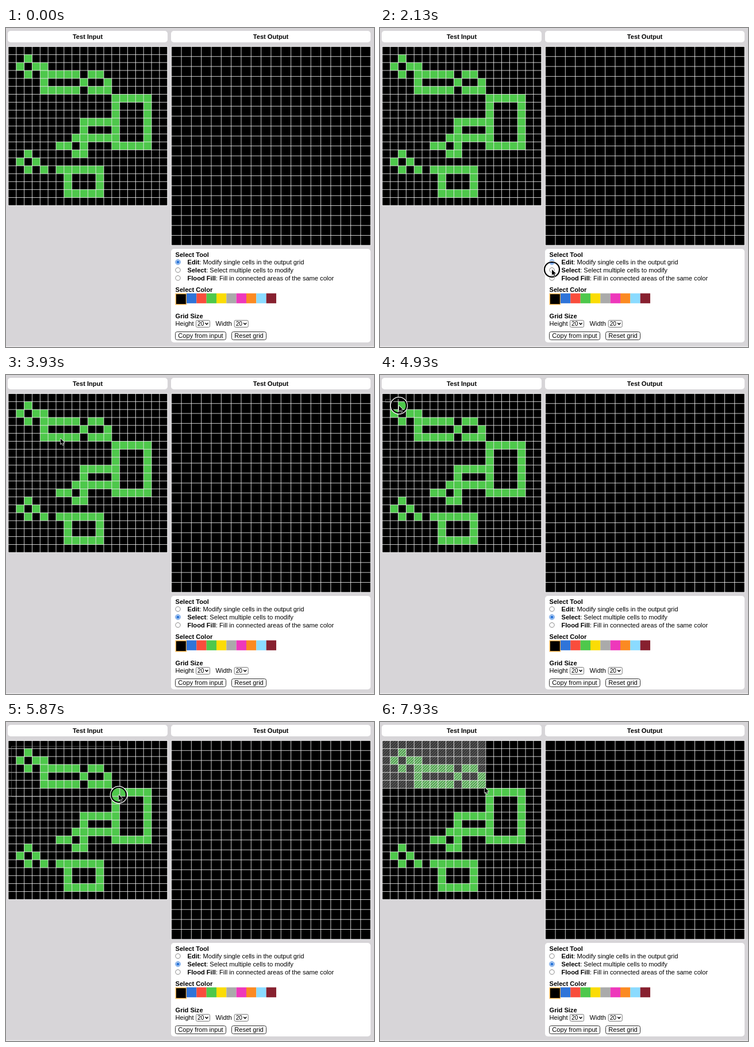
These frames come from a looping animation (640x556 px, 8 s). An HTML page with a canvas:

```html
<!DOCTYPE html>
<html lang="en">
<head>
<meta charset="utf-8">
<title>Grid editor</title>
<style>
  html, body { margin: 0; width: 100%; height: 100%; overflow: hidden; background: #d7d5d8; }
  canvas { display: block; }
</style>
</head>
<body>
<canvas id="stage" width="640" height="556"></canvas>
<script>
const ctx = document.getElementById('stage').getContext('2d');
const LOOP = 8000;
const FONT = '"Liberation Sans", Arial, sans-serif';
const GREEN = '#4ec84b';

const PATTERN = [
  '',
  '..#',
  '.#.##',
  '..#.#####.##',
  '....#....#..#',
  '....#####.###',
  '.............#####',
  '.............#...#',
  '.............#...#',
  '.........#####...#',
  '.........#...#...#',
  '........######...#',
  '......##.#...#####',
  '..#.....##',
  '.#.#',
  '..#.#.######',
  '.......#...#',
  '.......#...#',
  '.......#####'
];
const SWATCHES = ['#2f74d9', '#f94d3c', GREEN, '#fbdc05', '#aaaaaa', '#ee38bb', '#fb8a22', '#8bdbff', '#87202f'];
const TOOLS = [
  ['Edit', ': Modify single cells in the output grid'],
  ['Select', ': Select multiple cells to modify'],
  ['Flood Fill', ': Fill in connected areas of the same color']
];

// Pointer path: time, x, y
const PATH = [
  [900, 232, 360], [1070, 272, 417], [1250, 272, 417], [1900, 299, 421], [3000, 299, 421],
  [3930, 95, 111], [4600, 9, 42], [4760, 9, 42], [5400, 194, 130], [5530, 206, 136],
  [6300, 182, 114], [8000, 182, 114]
];
const DRAG_START = 4760, RELEASE = 7440;

function tangent(i, axis) {
  const a = PATH[i - 1], b = PATH[i], c = PATH[i + 1];
  if (!a || !c || (b[axis] - a[axis]) * (c[axis] - b[axis]) <= 0) return 0;
  return (c[axis] - a[axis]) / (c[0] - a[0]);
}

function pointerAt(t) {
  let i = 0;
  while (i < PATH.length - 2 && t >= PATH[i + 1][0]) i++;
  const a = PATH[i], b = PATH[i + 1], span = b[0] - a[0];
  const u = Math.max(0, Math.min(1, (t - a[0]) / span)), v = 1 - u;
  return [1, 2].map(k =>
    a[k] * (1 + 2 * u) * v * v + b[k] * u * u * (3 - 2 * u) +
    span * u * v * (tangent(i, k) * v - tangent(i + 1, k) * u));
}

function rect(x, y, w, h, color) {
  ctx.fillStyle = color;
  ctx.fillRect(x, y, w, h);
}

function box(x, y, w, h, radius, fill, stroke) {
  ctx.beginPath();
  ctx.roundRect(x, y, w, h, radius);
  ctx.fillStyle = fill;
  ctx.fill();
  if (stroke) {
    ctx.strokeStyle = stroke;
    ctx.lineWidth = 1;
    ctx.stroke();
  }
}

function circle(x, y, r, color, width) {
  ctx.beginPath();
  ctx.arc(x, y, r, 0, 7);
  ctx.fillStyle = ctx.strokeStyle = color;
  ctx.lineWidth = width;
  width ? ctx.stroke() : ctx.fill();
}

// Returns the x where the text ends
function text(str, x, y, { bold = false, size = 11.1, align = 'left' } = {}) {
  ctx.font = `${bold ? 'bold ' : ''}${size}px ${FONT}`;
  ctx.textAlign = align;
  ctx.fillStyle = '#000';
  ctx.fillText(str, x, y);
  return x + ctx.measureText(str).width;
}

// x and y are the centres of the first grid lines
function grid(x, y, step, pattern, selection) {
  const size = step * 20;
  rect(x, y, size, size, '#000');
  pattern.forEach((row, r) => [...row].forEach((cell, c) => {
    if (cell === '#') rect(x + c * step, y + r * step, step, step, GREEN);
  }));
  if (selection) hatch(x, y, selection[0] * step, selection[1] * step);
  ctx.beginPath();
  for (let i = 0; i <= 20; i++) {
    const d = i * step;
    ctx.moveTo(x + d, y - .5);
    ctx.lineTo(x + d, y + size + .5);
    ctx.moveTo(x - .5, y + d);
    ctx.lineTo(x + size + .5, y + d);
  }
  ctx.strokeStyle = 'rgba(255,255,255,.8)';
  ctx.lineWidth = 1;
  ctx.stroke();
}

function hatch(x, y, w, h) {
  ctx.save();
  ctx.beginPath();
  ctx.rect(x, y, w, h);
  ctx.clip();
  rect(x, y, w, h, 'rgba(255,255,255,.33)');
  ctx.beginPath();
  for (let dx = -h; dx < w; dx += 4.61) {
    ctx.moveTo(x + dx, y + h);
    ctx.lineTo(x + dx + h, y);
  }
  ctx.strokeStyle = 'rgba(0,0,0,.5)';
  ctx.lineWidth = 1.1;
  ctx.stroke();
  ctx.restore();
}

function radio(y, checked) {
  circle(299, y, 4.2, checked ? '#2b76d9' : '#858585', 1);
  if (checked) circle(299, y, 2.7, '#2b76d9');
}

function dropdown(label, x, boxX) {
  text(label, x, 519);
  box(boxX + .5, 509.5, 24, 12, 2, '#fff', '#777');
  text('20', boxX + 3, 519, { size: 10.2 });
  ctx.beginPath();
  ctx.moveTo(boxX + 16.5, 514);
  ctx.lineTo(boxX + 19, 516.8);
  ctx.lineTo(boxX + 21.5, 514);
  ctx.strokeStyle = '#000';
  ctx.lineWidth = 1.4;
  ctx.stroke();
}

function button(label, x, w) {
  box(x + .5, 529.5, w, 14, 3, '#fff', '#333');
  text(label, x + .5 + w / 2, 540, { size: 11.1, align: 'center' });
}

function panel(tool) {
  box(287, 385, 347, 163, 5, '#fff');
  text('Select Tool', 294.5, 399, { bold: true });
  TOOLS.forEach(([name, hint], i) => {
    const y = 408 + i * 13.9;
    radio(y, i === tool);
    text(hint, text(name, 315.5, y + 4.3, { bold: true }), y + 4.3);
  });
  text('Select Color', 294.5, 460, { bold: true });
  SWATCHES.forEach((color, i) => rect(314 + i * 17.33, 462.5, 17.33, 17.3, color));
  rect(294.5, 462.5, 19.5, 20, '#f0b450');
  rect(296, 464, 16.8, 17, '#000');
  text('Grid Size', 294.5, 506, { bold: true });
  dropdown('Height', 294.5, 330);
  dropdown('Width', 364.6, 396.7);
  button('Copy from input', 294, 88);
  button('Reset grid', 392, 60);
}

function pointer(x, y) {
  ctx.beginPath();
  [[0, 0], [0, 9.8], [2.3, 7.7], [3.8, 11.3], [5.5, 10.6], [3.9, 7.2], [7, 7]]
    .forEach(([dx, dy]) => ctx.lineTo(x + dx, y + dy));
  ctx.closePath();
  ctx.lineJoin = 'round';
  ctx.strokeStyle = '#fff';
  ctx.lineWidth = 1.4;
  ctx.stroke();
  ctx.fillStyle = '#000';
  ctx.fill();
}

function marquee(t) {
  const [x0, y0] = pointerAt(DRAG_START);
  const [x, y] = pointerAt(Math.max(DRAG_START, t - 66));
  ctx.setLineDash([1, 1]);
  ctx.strokeStyle = '#858585';
  ctx.lineWidth = 1;
  ctx.strokeRect(x0 + .5, y0 + .5, Math.round(x - x0), Math.round(y - y0));
  ctx.setLineDash([]);
}

function draw(t) {
  rect(0, 0, 640, 556, '#d7d5d8');
  rect(0, 554.5, 640, 1.5, '#ebeaec');
  box(3, 5, 278, 20, 5, '#fff');
  box(287, 5, 347, 20, 5, '#fff');
  text('Test Input', 142, 19, { bold: true, align: 'center' });
  text('Test Output', 460.5, 19, { bold: true, align: 'center' });
  grid(3.95, 32.5, 13.84, PATTERN, t >= RELEASE && [13, 6]);
  grid(287.7, 32.4, 17.32, []);
  panel(t < 2200 ? 0 : 1);

  if (t >= DRAG_START && t < RELEASE) marquee(t);
  if (t < PATH[0][0]) return;
  const [x, y] = pointerAt(t);
  if ((t >= 2000 && t < 2260) || (t >= 4690 && t < 7560)) {
    circle(x, y, 14.4, '#fff', 1.8);
    circle(x, y, 13, '#000', 2.2);
  }
  pointer(x, y);
}

function tick() {
  draw(performance.now() % LOOP);
  requestAnimationFrame(tick);
}
tick();
</script>
</body>
</html>
```
